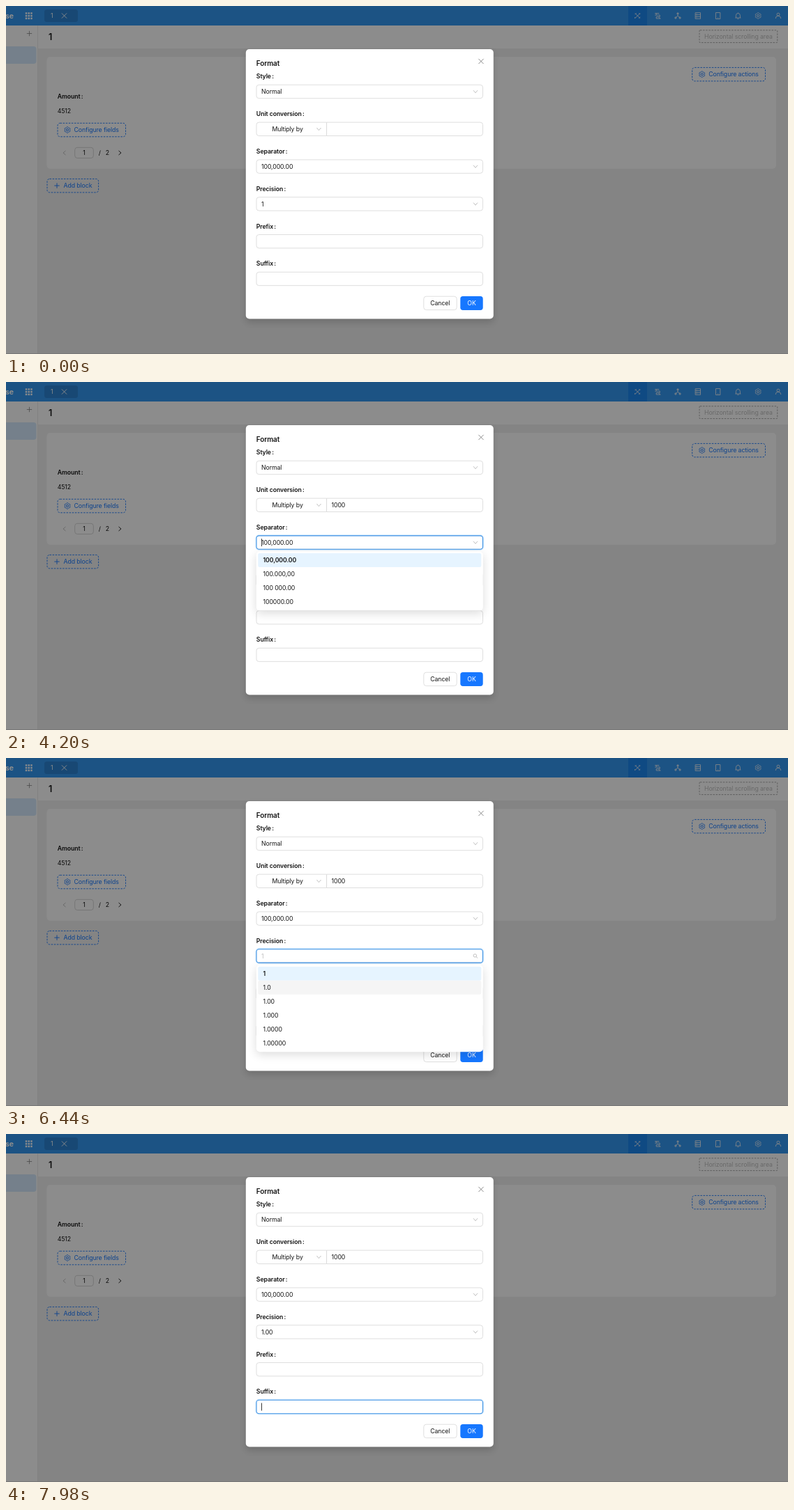
An HTML page with a canvas that plays this animation: 1121 px wide and 500 px high, repeating every 8 s.

```html
<!DOCTYPE html>
<html lang="en">
<head>
<meta charset="utf-8">
<title>Format dialog</title>
<style>
html, body { margin: 0; width: 100%; height: 100%; overflow: hidden; background: #848484; }
canvas { display: block; }
</style>
</head>
<body>
<canvas id="stage" width="1121" height="500"></canvas>
<script>
const LOOP = 8000, STEP = 70;
const INK = '#141414', LINE = '#d9d9d9', FAINT = '#b8b8b8', BLUE = '#1677ff', FOCUS = [58, 142, 226];
const c = document.getElementById('stage').getContext('2d');

const within = (t, ...spans) => spans.some(([a, b]) => t >= a && t < b);
// Rises from 0 to 1; the first visible change is at a, the last at b.
const ramp = (t, a, b) => Math.min(1, Math.max(0, (t - a + STEP) / (b - a + STEP)));
const pulse = (t, a, b, d, e) => ramp(t, a, b) - ramp(t, d, e);

function text(s, x, cy, color = INK, { size = 8.75, weight = 400, align = 'left' } = {}) {
  c.font = `${weight} ${size}px Inter, "Open Sans", sans-serif`;
  c.letterSpacing = '-0.1px';
  c.textAlign = align;
  c.fillStyle = color;
  c.fillText(s, x, cy + size * 0.365);
  return c.measureText(s).width;
}

function label(s, x, cy) {
  const w = text(s, x, cy, INK, { weight: 600 });
  text(':', x + w + 1.3, cy, INK, { weight: 600 });
}

function box(x, y, w, h, r, fill, stroke, width = 0.8, dash = []) {
  c.beginPath();
  c.roundRect(x, y, w, h, r);
  if (fill) { c.fillStyle = fill; c.fill(); }
  if (stroke) {
    c.strokeStyle = stroke;
    c.lineWidth = width;
    c.setLineDash(dash);
    c.stroke();
    c.setLineDash([]);
  }
}

function icon(d, x, y, color, width = 0.9) {
  c.save();
  c.translate(x, y);
  c.strokeStyle = color;
  c.lineWidth = width;
  c.stroke(new Path2D(d));
  c.restore();
}

const CROSS = 'M-3.6-3.6L3.6 3.6M3.6-3.6L-3.6 3.6';
const PLUS = 'M-3.7 0H3.7M0-3.7V3.7';
const DOWN = 'M-3-1.8L0 1.8L3-1.8';
const SEARCH = 'M1.5-.5A2.2 2.2 0 1 1-2.9-.5A2.2 2.2 0 1 1 1.5-.5M.9 1.1L3.2 3.2';
const GEAR = 'M' + Array.from({ length: 48 }, (_, i) => {
  const a = i * Math.PI / 24, r = 3.9 + 0.45 * Math.cos(6 * a);
  return `${(r * Math.sin(a)).toFixed(2)} ${(r * Math.cos(a)).toFixed(2)}`;
}).join('L') + 'ZM1.6 0A1.6 1.6 0 1 1-1.6 0A1.6 1.6 0 1 1 1.6 0';
const TOOLS = [
  'M-3.5-3.5L3.5 3.5M-3.5 3.5L3.5-3.5M-3.8-1.8L-1.8-3.8M1.8 3.8L3.8 1.8M2-3.8L3.8-2M-3.8 3.8V2',
  'M-4-3.5H2M-4-1H3V1.5H-2V4H4M-2-3.5V-1M1.5 2.5L4 4',
  'M0-4V0L-3.2 3M0 0L3.2 3M-1-4H1V-2.4H-1ZM-4 2H-2.2V4H-4ZM2.2 2H4V4H2.2Z',
  'M-3.7-4.3H3.7V4.3H-3.7ZM-3.7-1.4H3.7M-3.7 1.4H3.7M-2.2-2.8H-1.2M-2.2 0H-1.2M-2.2 2.8H-1.2',
  'M-3.2-4.5H3.2V4.5H-3.2ZM-.6 3H.6',
  'M-4 3H4M-3 3V-.5A3 3 0 0 1 3-.5V3M0-4.5V-3.5M-1 4.4H1',
  GEAR,
  'M2-1.9A2 2 0 1 1-2-1.9A2 2 0 1 1 2-1.9M-3.8 4A3.8 3.8 0 0 1 3.8 4'
];

function dashedButton(x, y, w, glyph, s) {
  box(x, y, w, 19.5, 3.5, null, BLUE, 0.9, [2.5, 1.6]);
  icon(glyph, x + 14, y + 9.7, BLUE);
  text(s, x + 23.5, y + 9.7, BLUE);
}

function page() {
  c.fillStyle = '#f0f0f0';
  c.fillRect(0, 0, 1121, 500);
  c.fillStyle = '#fff';
  c.fillRect(0, 28, 1121, 33);
  c.fillRect(0, 28, 45, 472);
  c.fillStyle = '#eaeaea';
  c.fillRect(45, 28, 1, 472);
  c.fillStyle = '#3296f0';
  c.fillRect(0, 0, 1121, 28);
  c.fillStyle = '#1b86ee';
  c.fillRect(892, 0, 27, 28);

  text('se', -1, 14, '#fff', { size: 10.5, weight: 700 });
  c.fillStyle = '#f4f8ff';
  for (let i = 0; i < 9; i++) c.fillRect(27.8 + i % 3 * 3.7, 9.2 + Math.floor(i / 3) * 3.7, 2.5, 2.5);
  box(55, 5, 48, 18, 3.5, '#2c83d2');
  text('1', 64, 14, '#fff');
  icon(CROSS, 83.5, 14, '#fff');
  TOOLS.forEach((d, i) => icon(d, 905.4 + i * 28.8, 14, '#e8f0f8'));

  icon(PLUS, 33.5, 39.5, '#888', 0.8);
  box(0, 58, 43.5, 25, [0, 4, 4, 0], '#d5e9fc');
  text('1', 61, 44.5, INK, { size: 12.5, weight: 600 });
  box(994, 34.8, 111.8, 17.8, 1, null, '#a0a0a0', 0.9, [2.5, 1.6]);
  text('Horizontal scrolling area', 1001, 44, '#bcbcbc');

  box(58.5, 73, 1045.5, 160.7, 5, '#fff');
  dashedButton(983.7, 88.4, 104.8, GEAR, 'Configure actions');
  label('Amount', 73.7, 130);
  text('4512', 73.7, 151.3);
  dashedButton(74, 168.3, 97.5, GEAR, 'Configure fields');
  icon('M2-3L-1.5 0L2 3', 83.5, 211, '#bbb');
  box(98.7, 203.3, 26.6, 15.2, 3.5, null, '#ccc');
  text('1', 112, 211, INK, { align: 'center' });
  text('/', 134.3, 211, INK, { align: 'center' });
  text('2', 145.3, 211, INK, { align: 'center' });
  icon('M-2-3L1.5 0L-2 3', 163.5, 211, INK);
  dashedButton(59, 248.4, 73.6, PLUS, 'Add block');

  c.fillStyle = 'rgba(0,0,0,.45)';
  c.fillRect(0, 0, 1121, 500);
  c.fillStyle = '#777';
  c.fillRect(0, 499, 1121, 1);
}

function shadow(color, blur, dy) {
  c.shadowColor = color;
  c.shadowBlur = blur;
  c.shadowOffsetY = dy;
}

// glow tints the border, ring adds the focus outline
function field(x, cy, w, glow = 0, ring = 0, r = 3.7) {
  if (ring) box(x - 0.6, cy - 10.4, w + 1.2, 20.8, 4, null, `rgba(5,145,255,${0.16 * ring})`, 1.8);
  const mix = FOCUS.map(v => Math.round(217 + (v - 217) * glow));
  box(x, cy - 9.7, w, 19.4, r, '#fff', `rgb(${mix})`, 0.85 + 0.25 * glow);
}

function caret(x, cy) {
  c.fillStyle = '#222';
  c.fillRect(x, cy - 5.5, 0.9, 11);
}

function select(cy, value, glow, ring, open) {
  field(359, cy, 324.5, glow, ring);
  text(value, 366, cy, open ? '#bfbfbf' : INK);
  icon(open ? SEARCH : DOWN, 673, cy, FAINT);
}

function dropdown(y, options, hover, shown) {
  if (shown <= 0) return;
  const h = options.length * 20 + 5;
  c.save();
  c.globalAlpha = shown;
  c.translate(0, y);
  c.scale(1, 0.8 + 0.2 * shown);
  shadow('rgba(0,0,0,.14)', 14, 4);
  box(358.8, 0, 325, h, 5, '#fff');
  shadow('transparent', 0, 0);
  options.forEach((s, i) => {
    const top = 2.5 + i * 20;
    if (i === 0 || i === hover) box(361.3, top, 320, 20, 2.5, i ? '#f5f5f5' : '#e6f4ff');
    text(s, 368.5, top + 10, INK, { weight: i ? 400 : 600 });
  });
  c.restore();
}

const SEPARATORS = ['100,000.00', '100.000,00', '100 000.00', '100000.00'];
const PRECISIONS = ['1', '1.0', '1.00', '1.000', '1.0000', '1.00000'];
const ROW = i => 123 + i * 53.8;

function unitInput(t) {
  const cy = ROW(1);
  field(359, cy, 100.5, 0, 0, [3.7, 0, 0, 3.7]);
  text('Multiply by', 403.6, cy, INK, { align: 'center' });
  icon(DOWN, 448.5, cy, FAINT);

  const glow = t >= 3570 ? (t < 3640 ? 0.85 : 0) : ramp(t, 420, 490);
  field(459.6, cy, 223.9, glow, within(t, [770, 3570]) ? 1 : 0, [0, 3.7, 3.7, 0]);
  const handles = pulse(t, 420, 490, 3220, 3360);
  if (handles > 0) {
    c.globalAlpha = handles;
    icon('M669.5-9.2V9.2M669.5 0H683', 0, cy, LINE, 0.8);
    icon('M-1.8 1L0-1L1.8 1', 676.3, cy - 4.6, '#888', 0.8);
    icon('M-1.8-1L0 1L1.8-1', 676.3, cy + 4.8, '#888', 0.8);
    c.globalAlpha = 1;
  }
  const typed = [1610, 2030, 2170, 2310].filter(at => t >= at).length;
  const w = text('1000'.slice(0, typed), 466.5, cy);
  if (within(t, [770, 1260], [1610, 2870], [3290, 3570])) caret(466.7 + w, cy);
}

function dialog(t) {
  shadow('rgba(0,0,0,.16)', 10, 5);
  box(343.8, 62, 355, 387.5, 5, '#fff');
  shadow('transparent', 0, 0);
  text('Format', 358.8, 82, INK, { size: 10, weight: 600 });
  icon(CROSS, 681, 79.5, '#8c8c8c', 1);
  ['Style', 'Unit conversion', 'Separator', 'Precision', 'Prefix', 'Suffix']
    .forEach((s, i) => label(s, 358.8, ROW(i) - 21.8));

  select(ROW(0), 'Normal', 0, 0, false);
  unitInput(t);

  const sepRing = within(t, [4130, 5950]) ? 1 : 0;
  select(ROW(2), SEPARATORS[0], pulse(t, 3990, 4130, 5880, 6020), sepRing, within(t, [4620, 5110]));
  if (within(t, [4130, 4690], [5180, 5740])) caret(366, ROW(2));

  const preRing = within(t, [5950, 7700]) ? 1 : 0;
  select(ROW(3), PRECISIONS[t < 7000 ? 0 : 2], pulse(t, 5320, 5530, 7700, 7910), preRing, within(t, [5950, 7070]));
  if (within(t, [5950, 6440], [7140, 7490])) caret(366, ROW(3));

  field(359, ROW(4), 324.5);
  field(359, ROW(5), 324.5, ramp(t, 7630, 7840), t >= 7840 ? 1 : 0);
  if (t >= 7910) caret(366, ROW(5));

  box(598.8, 417.2, 47.4, 19.4, 3.7, '#fff', LINE);
  text('Cancel', 622.3, 427, INK, { align: 'center' });
  box(651.3, 417, 32.4, 20, 3.7, BLUE);
  text('OK', 667.5, 427, '#fff', { align: 'center' });

  dropdown(243.6, SEPARATORS, -1, pulse(t, 4130, 4200, 5040, 5110));
  dropdown(297.2, PRECISIONS, t < 6160 ? -1 : 1, pulse(t, 6020, 6160, 7000, 7140));
}

const start = performance.now();
function draw(now) {
  const t = Math.floor(Math.max(0, now - start) % LOOP / STEP) * STEP;
  page();
  dialog(t);
  requestAnimationFrame(draw);
}
draw(start);
</script>
</body>
</html>
```
